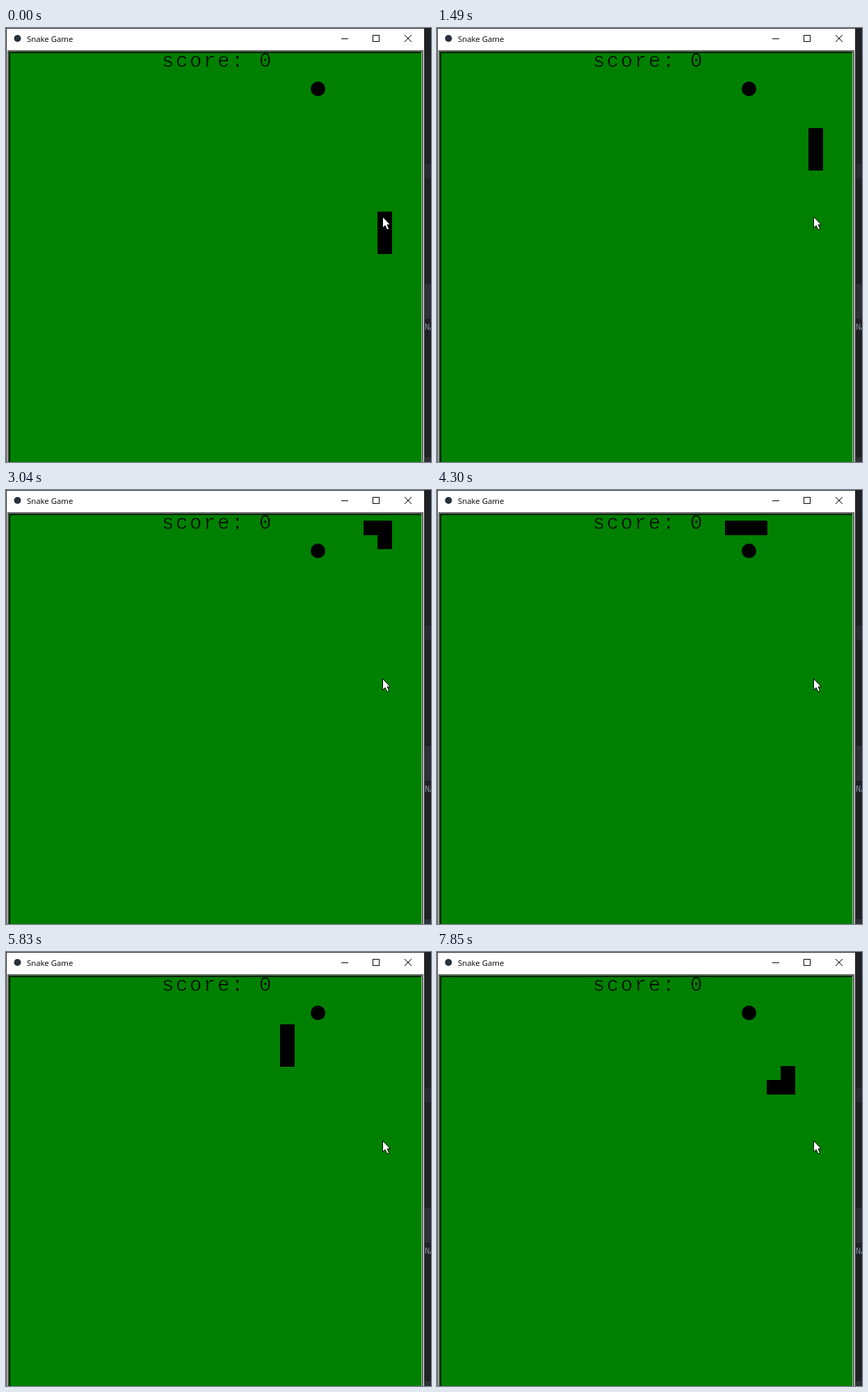
An HTML page with a canvas that plays this animation: 611x624 px, repeating every 8 s.

```html
<!DOCTYPE html>
<html lang="en">
<head>
<meta charset="utf-8">
<title>Snake Game</title>
<style>
  html, body { margin: 0; width: 100%; height: 100%; overflow: hidden; background: #202125; }
  canvas { display: block; }
</style>
</head>
<body>
<canvas id="stage" width="611" height="624"></canvas>
<script>
const ctx = document.getElementById('stage').getContext('2d');
const LOOP = 8000, CELL = 20, LENGTH = 3;
const GREEN = '#008000', BLACK = '#000';

// Moves come every 230 ms in short runs; each run waits a little for the next.
const RUNS = [270, 800, 2030, 3040, 3800, 5070, 5830, 6840, 7850];
const TICK = 230, MEAN_TICK = 253;

// The route is a few straight legs.
const MOVES = 'U'.repeat(11) + 'L'.repeat(7) + 'D'.repeat(7) + 'R'.repeat(5) + 'U';
const DIRS = { U: [0, -1], D: [0, 1], L: [-1, 0], R: [1, 0] };

const trail = [[534, 304], [534, 284], [534, 264]];
for (const m of MOVES) {
  const [x, y] = trail[trail.length - 1];
  trail.push([x + DIRS[m][0] * CELL, y + DIRS[m][1] * CELL]);
}

function stepAt(t) {
  let step = 0;
  RUNS.forEach((start, i) => {
    if (t < start) return;
    const next = RUNS[i + 1] ?? start + MEAN_TICK;
    const count = Math.round((next - start) / MEAN_TICK);
    step += Math.min(count, 1 + Math.floor((t - start) / TICK));
  });
  return step;
}

function box(x, y, w, h, color) {
  ctx.fillStyle = color;
  ctx.fillRect(x, y, w, h);
}

function disc(x, y, r, color) {
  ctx.fillStyle = color;
  ctx.beginPath();
  ctx.arc(x, y, r, 0, Math.PI * 2);
  ctx.fill();
}

function label(text, x, y, font, color) {
  ctx.font = font;
  ctx.fillStyle = color;
  ctx.fillText(text, x, y);
}

function drawEditor() {
  box(0, 0, 611, 624, '#202125');
  box(602, 195, 9, 21, '#2a2b30');
  box(602, 368, 9, 50, '#2d3036');
  box(602, 617, 9, 7, '#303136');
  label('NA', 602, 434, '12px "Noto Sans Mono", monospace', '#8294a6');
}

function drawTitleBar() {
  box(0, 0, 602, 624, '#303030');
  box(1, 1, 600, 30, '#fff');
  disc(16.5, 15, 5, '#26323c');
  label('Snake Game', 30, 20, '11.4px "Open Sans", sans-serif', BLACK);

  box(482, 15, 10, 1, BLACK);
  ctx.strokeStyle = BLACK;
  ctx.lineWidth = 1;
  ctx.strokeRect(527.5, 10.5, 9, 9);
  ctx.beginPath();
  ctx.moveTo(573, 10);
  ctx.lineTo(583, 20);
  ctx.moveTo(583, 10);
  ctx.lineTo(573, 20);
  ctx.stroke();
}

// Padding, focus ring and a sunken bevel around the green field.
function drawField() {
  box(1, 31, 600, 593, '#f0f0f0');
  box(2, 32, 598, 592, '#646464');
  box(4, 34, 594, 590, '#80bf80');
  box(4, 34, 593, 590, '#004d00');
  box(5, 35, 592, 589, BLACK);
  box(6, 36, 591, 588, GREEN);
}

function drawScore() {
  ctx.save();
  ctx.letterSpacing = '2.6px';
  label('score: 0', 224, 55.5, '29px "Liberation Mono", monospace', BLACK);
  // Thins the letters to a light weight.
  ctx.strokeStyle = GREEN;
  ctx.lineWidth = 0.7;
  ctx.strokeText('score: 0', 224, 55.5);
  ctx.restore();
}

function drawCursor(x, y) {
  const shape = [[0, 0], [0, 16], [3.6, 12.6], [6.4, 18.6], [9.2, 17.4], [6.6, 11.4], [11, 11.4]];
  ctx.beginPath();
  for (const [dx, dy] of shape) ctx.lineTo(x + dx, y + dy);
  ctx.closePath();
  ctx.fillStyle = '#fff';
  ctx.fill();
  ctx.strokeStyle = BLACK;
  ctx.lineWidth = 1;
  ctx.stroke();
}

function draw() {
  const step = stepAt(performance.now() % LOOP);
  drawEditor();
  drawTitleBar();
  drawField();
  drawScore();
  disc(448.5, 87.5, 10.5, BLACK);
  for (const [x, y] of trail.slice(step, step + LENGTH)) box(x, y, CELL + 1, CELL + 1, BLACK);
  drawCursor(541.5, 271.5);
  requestAnimationFrame(draw);
}
draw();
</script>
</body>
</html>
```
